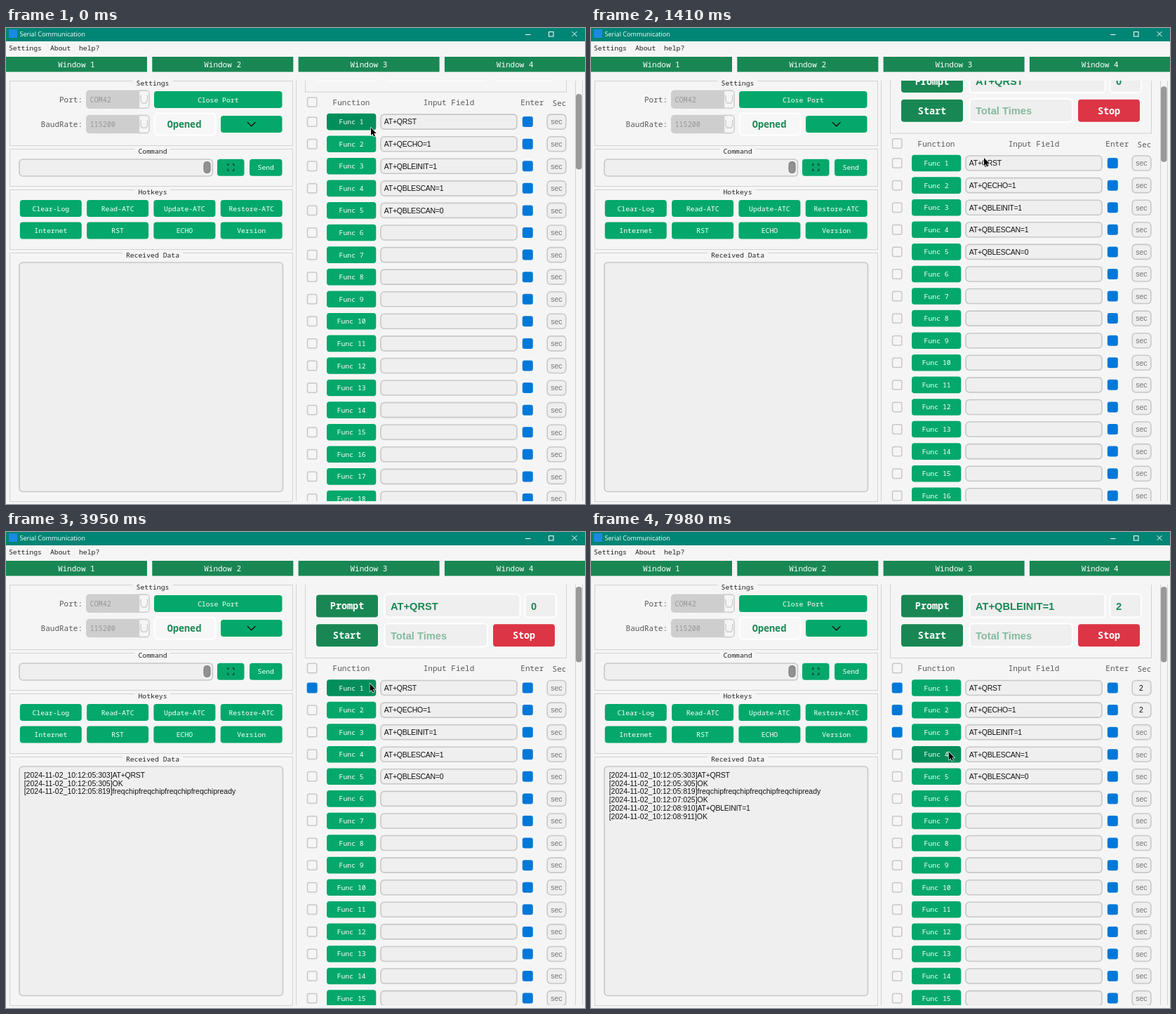
These frames come from a looping animation (825x678 px, 8 s). An HTML page with a canvas:

```html
<!DOCTYPE html>
<html lang="en">
<head>
<meta charset="utf-8">
<title>Serial Communication</title>
<style>
html, body { margin: 0; width: 825px; height: 678px; overflow: hidden; background: #f5f5f5; }
canvas { display: block; }
</style>
</head>
<body>
<canvas id="stage" width="825" height="678"></canvas>
<script>
const ctx = document.getElementById("stage").getContext("2d");
const LOOP = 8000;
const MONO = '"Noto Sans Mono", "DejaVu Sans Mono", monospace';
const SANS = '"Liberation Sans", Arial, sans-serif';
const UI = '"Open Sans", "Noto Sans", sans-serif';
const SMALL = 9.78, MEDIUM = 11, LARGE = 13.44;

const BG = "#f5f5f5", FIELD = "#efefef", LINE = "#d2d2d2", EDGE = "#c8c8c8";
const GREEN = "#04a86b", HOVER = "#028f5b", DARK = "#198754", BLUE = "#0078d7";
const INK = "#222", SOFT = "#5a5a5a";

const ROW_Y = 222, ROW_STEP = 31.58;
const COMMANDS = ["AT+QRST", "AT+QECHO=1", "AT+QBLEINIT=1", "AT+QBLESCAN=1", "AT+QBLESCAN=0"];
const CLICKS = [3360, 5110, 7030];
const LOG = [
  [3490, "05:303", "AT+QRST"],
  [3490, "05:305", "OK"],
  [3950, "05:819", "freqchip".repeat(4) + "ready"],
  [5170, "07:025", "OK"],
  [7100, "08:910", "AT+QBLEINIT=1"],
  [7100, "08:911", "OK"]
];
// start, end, steps, x, y
const MOVES = [
  [380, 660, 5, 560, 185],
  [2280, 2700, 7, 518.5, 216],
  [4360, 4500, 3, 523, 263.5],
  [4770, 4970, 4, 519.5, 262.5],
  [6360, 6770, 7, 518, 287],
  [7700, 7980, 5, 510, 313.5]
];

function stepped(t, start, end, count) {
  if (t < start) return 0;
  const i = Math.floor((t - start) / (end - start) * (count - 1) + 1e-6);
  return Math.min(count, i + 1) / count;
}

function pointer(t) {
  let x = 520, y = 142;
  for (const [start, end, count, toX, toY] of MOVES) {
    const p = stepped(t, start, end, count);
    x += (toX - x) * p;
    y += (toY - y) * p;
  }
  return { x, y };
}

function scrollAt(t) {
  return t < 1270 ? 88.4 : 73.6 * (1 - stepped(t, 1270, 1550, 5));
}

function box(x, y, w, h, r, fill, stroke, width = 1.6) {
  ctx.beginPath();
  ctx.roundRect(x, y, w, h, r);
  if (fill) {
    ctx.fillStyle = fill;
    ctx.fill();
  }
  if (stroke) {
    ctx.strokeStyle = stroke;
    ctx.lineWidth = width;
    ctx.stroke();
  }
}

function rect(x, y, w, h, fill) {
  ctx.fillStyle = fill;
  ctx.fillRect(x, y, w, h);
}

function path(points, stroke, width) {
  ctx.beginPath();
  points.forEach(([x, y]) => ctx.lineTo(x, y));
  ctx.strokeStyle = stroke;
  ctx.lineWidth = width;
  ctx.stroke();
}

// y is the middle of the capitals
function text(str, x, y, color, size, family = MONO, align = "center", weight = 400, spacing = 0) {
  ctx.font = `${weight} ${size}px ${family}`;
  ctx.textAlign = align;
  ctx.letterSpacing = spacing + "px";
  ctx.fillStyle = color;
  ctx.fillText(str, x, y + size * 0.36);
}

function command(str, x, y) {
  text(str, x, y, "#111", 10.5, SANS, "left", 400, -0.27);
}

function button(label, x, y, w, h, fill = GREEN) {
  box(x, y, w, h, 4, fill);
  if (label) text(label, x + w / 2, y + h / 2, "#fff", SMALL);
}

function bigButton(label, x, y, fill) {
  box(x - 1, y - 1, 90, 34, 5, "#fff");
  box(x, y, 88, 32, 4, fill);
  text(label, x + 44, y + 16, "#fff", LARGE, MONO, "center", 700);
}

function bigField(str, x, y, w, color) {
  box(x, y, w, 33, 5, FIELD, "#fff", 2);
  text(str, x + 8.5, y + 17, color, 14.67, SANS, "left", 700);
}

function checkbox(x, y, on) {
  if (on) box(x - 7.5, y - 7.5, 15, 15, 3, BLUE);
  else box(x - 6.7, y - 6.7, 13.4, 13.4, 2.5, BG, EDGE, 1.5);
}

function group(title, y, bottom) {
  ctx.strokeStyle = LINE;
  ctx.lineWidth = 1;
  ctx.strokeRect(5.5, y + 0.5, 403, bottom - y);
  const w = title.length * 5.87 + 10;
  rect(207 + 2 - w / 2, y - 1, w, 4, BG);
  text(title, 209, y + 3, INK, SMALL);
}

function combo(str, y) {
  box(114, y, 90.5, 26.5, 5, "#cecece");
  box(189.5, y + 0.8, 14.5, 25, [0, 4, 4, 0], BG, "#cecece", 1.4);
  path([[192, y + 7], [192, y + 15], [194, y + 18.5], [199.5, y + 18.5], [201.5, y + 15], [201.5, y + 7]], "#cecece", 1.4);
  text(str, 119.5, y + 13.5, "#999", 10.1, MONO, "left");
}

function titleBar() {
  rect(0, 0, 825, 19, "#018574");
  rect(4, 2, 12, 12, "#1a8ae2");
  text("Serial Communication", 19.5, 8.6, "#fff", 9.1, UI, "left");
  path([[740, 9.5], [747.5, 9.5]], "#fff", 1);
  ctx.strokeRect(773.5, 5.5, 6.5, 6.5);
  path([[806.5, 5], [813.5, 12]], "#fff", 1);
  path([[813.5, 5], [806.5, 12]], "#fff", 1);
  text("Settings", 4, 28, INK, SMALL, MONO, "left");
  text("About", 63, 28, INK, SMALL, MONO, "left");
  text("help?", 104, 28, INK, SMALL, MONO, "left");
  for (let i = 0; i < 4; i++) {
    const x = i * 208.3;
    rect(x, 41, 201, 21.5, DARK);
    text("Window " + (i + 1), x + 100.3, 52, "#fff", MEDIUM);
  }
}

function leftPanel(t) {
  group("Settings", 75, 167);
  text("Port:", 109, 102, SOFT, MEDIUM, MONO, "right");
  text("BaudRate:", 109, 137, SOFT, MEDIUM, MONO, "right");
  combo("COM42", 88.5);
  combo("115200", 123.7);
  button("Close Port", 211, 90, 182.5, 24);
  box(211.5, 121.5, 87, 31, 5, "#f7f7f7", "#fff", 2);
  text("Opened", 254, 137, DARK, LARGE, MONO, "center", 700);
  button("", 306, 125, 87.5, 24);
  path([[344, 134.3], [349.7, 139.7], [355.4, 134.3]], "#111", 1.4);

  group("Command", 172, 225);
  box(19, 187, 275.5, 24, 5, FIELD, EDGE);
  box(282, 190.5, 9, 16, 4, "#919191", "#777", 1);
  button("", 301, 186.7, 38.5, 24);
  for (const sx of [-1, 1]) for (const sy of [-1, 1]) {
    path([[320.3 + sx * 4.5, 198.5 + sy * 2], [320.3 + sx * 4.5, 198.5 + sy * 4.5], [320.3 + sx * 2, 198.5 + sy * 4.5]], "#222", 1.1);
  }
  button("Send", 347, 186.7, 46.5, 24);

  group("Hotkeys", 230, 315);
  ["Clear-Log", "Read-ATC", "Update-ATC", "Restore-ATC", "Internet", "RST", "ECHO", "Version"]
    .forEach((label, i) => button(label, 19.8 + (i % 4) * 95.3, i < 4 ? 245 : 276.5, 88, 24));

  group("Received Data", 320, 674);
  box(19, 334, 375.5, 326.5, 5, FIELD, EDGE);
  LOG.forEach(([at, time, str], i) => {
    if (t < at) return;
    const y = 346 + i * 11.78;
    const stamp = `[2024-11-02_10:12:${time}]`;
    text(stamp, 25.7, y, "#111", 10.5, SANS, "left");
    const x = 25.7 + ctx.measureText(stamp).width;
    if (str.startsWith("AT")) command(str, x, y);
    else text(str, x, y, "#111", 10.5, SANS, "left");
  });
}

function row(i, done, y, tip) {
  const top = y - 11.8;
  const hover = tip.x >= 457 && tip.x < 527.5 && tip.y >= top && tip.y < top + 23.6;
  checkbox(436.2, y, i < done);
  button("Func " + (i + 1), 457, top, 70.3, 23.6, hover ? HOVER : GREEN);
  box(534, y - 10.5, 194, 21, 5, FIELD, EDGE);
  if (COMMANDS[i]) command(COMMANDS[i], 538.8, y);
  checkbox(743.3, y, true);
  box(771.2, y - 10.5, 26.6, 21, 5, FIELD, EDGE);
  if (i < done - 1) text("2", 784, y, "#111", 10.5, SANS);
  else text("sec", 784.3, y, "#777", 10.5, SANS);
}

function rightPanel(t, tip) {
  const scroll = scrollAt(t);
  const done = CLICKS.filter(at => t >= at).length;
  const current = Math.max(0, done - 1);

  rect(413, 75, 1, 599, LINE);
  ctx.save();
  ctx.beginPath();
  ctx.rect(414, 75, 396, 599);
  ctx.clip();
  ctx.translate(0, -scroll);
  ctx.strokeStyle = LINE;
  ctx.lineWidth = 1;
  ctx.strokeRect(426.5, 60.5, 372, 119);
  bigButton("Prompt", 442, 89.5, DARK);
  bigField(COMMANDS[current], 539.5, 88.5, 193, DARK);
  bigField(String(current), 739.5, 88.5, 44.5, DARK);
  bigButton("Start", 442, 131.3, DARK);
  bigField("Total Times", 539.5, 130.5, 146.5, "#84bb9f");
  bigButton("Stop", 694, 131.3, "#dc3545");

  checkbox(436.2, 194, false);
  text("Function", 492, 194, SOFT, MEDIUM);
  text("Input Field", 631, 194, SOFT, MEDIUM);
  text("Enter", 749.8, 194, SOFT, MEDIUM);
  text("Sec", 788.5, 195, SOFT, MEDIUM);
  const local = { x: tip.x, y: tip.y + scroll };
  for (let i = 0; i < 18; i++) row(i, done, ROW_Y + i * ROW_STEP, local);
  ctx.restore();

  rect(811, 75, 1, 599, LINE);
  rect(821, 75, 1, 599, LINE);
  box(812, 78 + scroll * 0.18, 8.5, 107.5, 4, "#999");
}

function arrow({ x, y }) {
  const shape = [[0, 0], [0, 11], [2.5, 8.7], [4.2, 12.6], [6, 11.8], [4.3, 8], [7.8, 8]];
  ctx.beginPath();
  shape.forEach(([dx, dy]) => ctx.lineTo(x + dx, y + dy));
  ctx.closePath();
  ctx.strokeStyle = "#fff";
  ctx.lineWidth = 1.2;
  ctx.stroke();
  ctx.fillStyle = "#000";
  ctx.fill();
}

function draw(t) {
  const tip = pointer(t);
  rect(0, 0, 825, 678, BG);
  titleBar();
  leftPanel(t);
  rightPanel(t, tip);
  arrow(tip);
}

const begin = performance.now();
function frame() {
  draw((performance.now() - begin) % LOOP);
  requestAnimationFrame(frame);
}
frame();
</script>
</body>
</html>
```
